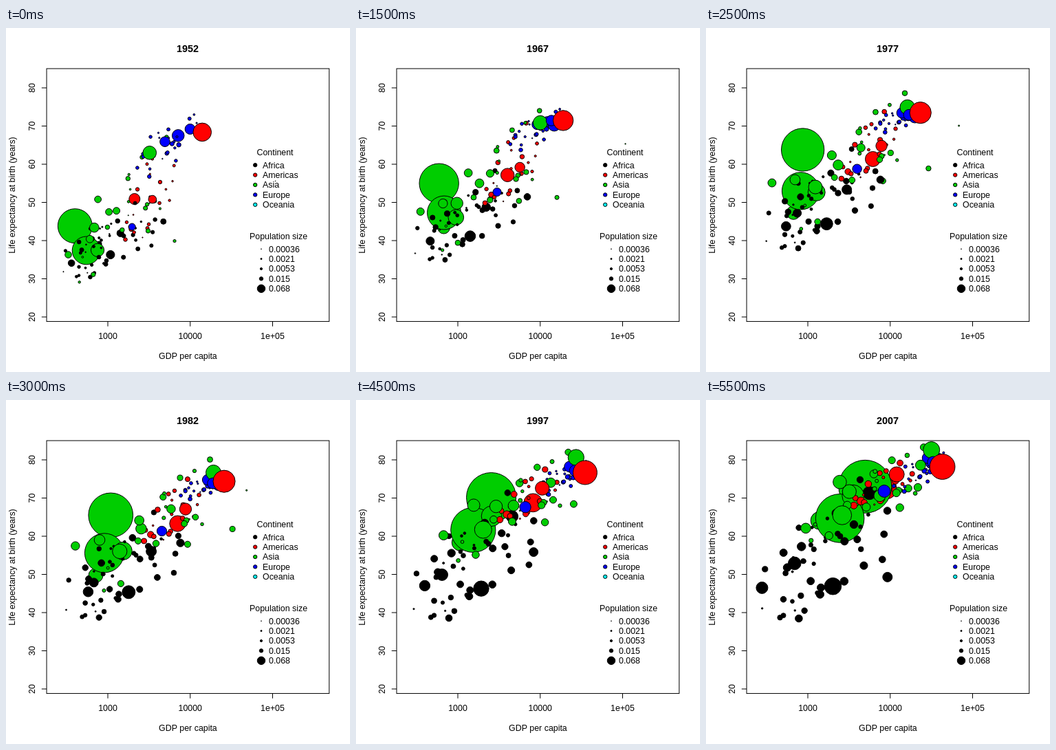
An HTML page with a canvas for the animation above (6 s loop, 500 by 500 pixels).

```html
<!DOCTYPE html>
<html lang="en">
<head>
<meta charset="utf-8">
<title>Life expectancy and GDP</title>
<style>
html, body { margin: 0; width: 100%; height: 100%; overflow: hidden; background: #fff; }
canvas { display: block; }
</style>
</head>
<body>
<canvas id="c" width="500" height="500"></canvas>
<script>
const ctx = document.getElementById('c').getContext('2d');
const FONT = '"Liberation Sans", Arial, sans-serif';
const BLACK = '#000', RED = '#f00', GREEN = '#00cd00', BLUE = '#00f', CYAN = '#0ff';
const STEPS = 12, STEP_MS = 500;

const xOf = gdp => 148 + 119.75 * (Math.log10(gdp) - 3);
const yOf = life => 87 + (80 - life) * 5.55;
const mix = (a, b, t) => a + (b - a) * t;

let seed = 11;
const random = () => (seed = seed * 16807 % 2147483647) / 2147483647;

// A bubble grows from r0 to r1 along evenly timed [gdp, life] points
const bubbles = [];
function add(color, r0, r1, ...path) {
  const bubble = { color, r0, r1, path: path.map(([gdp, life]) => [xOf(gdp), yOf(life)]) };
  bubbles.push(bubble);
  return bubble;
}

// Small countries scatter around a centre: [gdp, spread factor, life, spread]
function cloud(color, count, growth, ...centres) {
  while (count--) {
    const wealth = random() - random(), health = random() - random();
    const r = .6 + 2.8 * random();
    add(color, r, r * growth, ...centres.map(([gdp, factor, life, spread]) =>
      [gdp * factor ** wealth, life + spread * (wealth + health)]));
  }
}

// Large countries, in drawing order
add(GREEN, 7.3, 13, [684, 37.5], [668, 48.3], [1391, 64.1]);
add(RED, 8, 14.6, [2109, 50.9], [6850, 62.4], [9066, 72.4]);
const famine = { step: 2, drop: 9 * 5.55 };
add(GREEN, 25, 38.5, [400, 44], [645, 61.5], [1460, 67.8], [4959, 73]).dip = famine;
add(BLACK, 4, 8.5, [781, 39.1], [740, 48], [278, 46.5]);
add(BLACK, 5, 9.5, [1419, 41.9], [3200, 54.5], [5581, 71.3]);
add(BLACK, 4.8, 9.3, [362, 34.1], [567, 44.7], [691, 52.9]);
add(BLUE, 6.9, 8.3, [7030, 67.4], [19300, 74.3], [30470, 80.7]);
add(BLUE, 8.8, 9.6, [7144, 67.5], [17400, 70.9], [25300, 75.2], [32170, 79.4]);
add(GREEN, 20.4, 35.3, [547, 37.4], [715, 49.5], [1040, 59.1], [2452, 64.7]);
add(GREEN, 9.6, 15.9, [750, 37.5], [1000, 48], [1960, 60.8], [3541, 70.6]);

cloud(BLACK, 47, 1.9, [990, 5, 39, 8], [1400, 7, 50.5, 11], [1500, 9, 54.5, 15]);
cloud(RED, 20, 1.8, [3000, 2.5, 53, 14], [5300, 2.8, 66, 9], [7500, 3, 73.5, 6]);
cloud(GREEN, 20, 1.8, [1900, 5, 48, 14], [5000, 7, 62, 13], [7000, 8, 71, 9]);
cloud(BLUE, 25, 1.1, [5000, 3.5, 66, 8], [13500, 2.6, 73, 3], [22000, 3, 77.5, 5]);

add(BLUE, 7.3, 8.1, [4931, 65.9], [15400, 74.2], [28570, 80.5]);
add(GREEN, 9.8, 12, [3217, 63], [12900, 72.6], [24000, 79], [31656, 82.6]);
add(GREEN, 4.9, 7.4, [1031, 47.5], [5100, 66], [23348, 78.6]);
add(GREEN, .4, 1.7, [108382, 55.6], [108000, 67.5], [30500, 74.6], [47307, 77.6]);
add(RED, 5.8, 11, [3478, 50.8], [8500, 66.2], [11978, 76.2]);
add(GREEN, 4.8, 7.3, [331, 36.3], [371, 57], [944, 62.1]);
add(BLACK, 6.1, 12.3, [1077, 36.3], [1770, 45.2], [2014, 46.9]);
add(GREEN, 6.8, 13.8, [685, 43.4], [1310, 55.1], [2606, 65.5]);
add(GREEN, 5, 10.1, [1273, 47.8], [2480, 61], [3190, 71.7]);
add(GREEN, 2.1, 5.6, [6460, 39.9], [33900, 60.8], [21655, 72.8]);
add(BLACK, 4, 7, [4725, 45], [7600, 52.9], [7600, 61.3], [9270, 49.3]);
add(GREEN, 4.9, 8.5, [758, 50.8], [2150, 63.5], [7458, 70.6]);
add(BLUE, 5, 8.9, [1969, 43.6], [4250, 60.3], [8458, 71.8]);
add(BLUE, 7.5, 8.3, [9980, 69.2], [17800, 73.3], [33203, 79.4]);
add(RED, 13.3, 18.4, [13990, 68.4], [24500, 74], [42952, 78.2]);
add(GREEN, 5.4, 9.8, [605, 40.4], [710, 57.5], [2442, 74.2]);

function disc(x, y, r, color) {
  ctx.beginPath();
  ctx.arc(x, y, r, 0, 2 * Math.PI);
  ctx.fillStyle = color;
  ctx.fill();
  ctx.stroke();
}

function text(s, x, y, align = 'center', font = '12.4px ') {
  ctx.font = font + FONT;
  ctx.textAlign = align;
  ctx.fillStyle = BLACK;
  ctx.fillText(s, x, y);
}

function upright(s, x, y) {
  ctx.save();
  ctx.translate(x, y);
  ctx.rotate(-Math.PI / 2);
  text(s, 0, 0);
  ctx.restore();
}

function line(x1, y1, x2, y2) {
  ctx.beginPath();
  ctx.moveTo(x1, y1);
  ctx.lineTo(x2, y2);
  ctx.stroke();
}

function drawBubble({ color, r0, r1, path, dip }, step) {
  const t = step / (STEPS - 1), pos = t * (path.length - 1);
  const k = Math.min(Math.floor(pos), path.length - 2);
  const [x, y] = path[k].map((v, i) => mix(v, path[k + 1][i], pos - k));
  const fall = dip ? dip.drop * Math.exp(-((step - dip.step) ** 2)) : 0;
  disc(x, y + fall, mix(r0, r1, t), color);
}

function axes() {
  ctx.strokeRect(59.04, 59.04, 410.72, 367.52);
  ['1000', '10000', '1e+05'].forEach(s => {
    const x = xOf(Number(s));
    line(x, 426.5, x, 433.7);
    text(s, x, 452);
  });
  for (let life = 20; life <= 80; life += 10) {
    const y = yOf(life);
    line(51.8, y, 59, y);
    upright(life, 42, y);
  }
  text('GDP per capita', 264.4, 481);
  upright('Life expectancy at birth (years)', 13, 243);
}

function legends() {
  text('Continent', 391, 185);
  [['Africa', BLACK], ['Americas', RED], ['Asia', GREEN], ['Europe', BLUE], ['Oceania', CYAN]]
    .forEach(([name, color], i) => {
      const y = 199.2 + i * 14.4;
      disc(362.2, y, 2.7, color);
      text(name, 373, y + 4.4, 'left');
    });
  text('Population size', 396, 307);
  [.00036, .0021, .0053, .015, .068].forEach((share, i) => {
    const y = 321.2 + i * 14.4;
    disc(371, y, 22 * Math.sqrt(share), BLACK);
    text(share, 382, y + 4.4, 'left');
  });
}

function draw(step) {
  ctx.fillStyle = '#fff';
  ctx.fillRect(0, 0, 500, 500);
  ctx.strokeStyle = BLACK;
  ctx.lineWidth = 1;
  bubbles.forEach(b => drawBubble(b, step));
  axes();
  text(1952 + 5 * step, 264, 35, 'center', 'bold 14.4px ');
  legends();
}

const start = performance.now();
let shown = -1;
function tick() {
  const step = Math.floor((performance.now() - start) / STEP_MS) % STEPS;
  if (step !== shown) draw(shown = step);
  requestAnimationFrame(tick);
}
tick();
</script>
</body>
</html>
```
